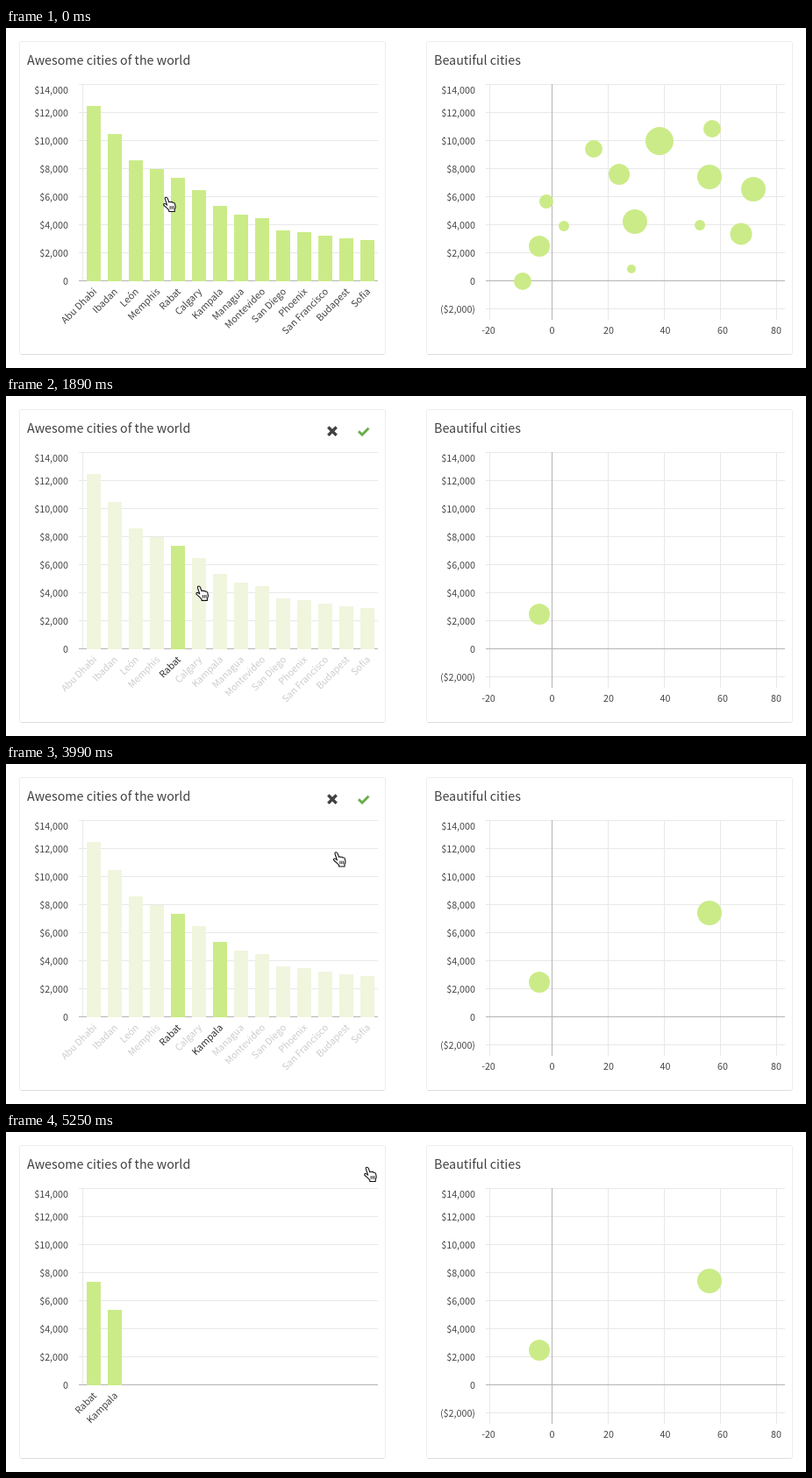
An HTML page that plays this animation: 912x388 px, repeating every 6250 ms.

```html
<!DOCTYPE html>
<html lang="en">
<head>
<meta charset="utf-8">
<title>City charts</title>
<style>
  html, body { margin: 0; width: 100%; height: 100%; overflow: hidden; background: #fff; }
  svg { display: block; width: 912px; height: 388px; }
  text { font: 10.75px "Noto Sans CJK SC", "Noto Sans CJK JP", "Noto Sans CJK", "Noto Sans", sans-serif; fill: #444; }
  .title { font-size: 14.3px; fill: #404040; }
</style>
</head>
<body>
<svg id="stage" viewBox="0 0 912 388"></svg>
<script>
const NS = 'http://www.w3.org/2000/svg';
const LOOP = 6250, STEP = 70;
const GREEN = [203, 235, 136], PALE = [240, 245, 221];
const INK = [68, 68, 68], FAINT = [204, 204, 204], STRONG = [48, 48, 48];
const GRID = '#e8e8e8', AXIS = '#b4b4b4';
const RABAT = 4, KAMPALA = 6;

const cities = [
  ['Abu Dhabi', 89], ['Ibadan', 121], ['León', 151], ['Memphis', 161], ['Rabat', 171],
  ['Calgary', 185], ['Kampala', 203], ['Managua', 213], ['Montevideo', 217], ['San Diego', 231],
  ['Phoenix', 233], ['San Francisco', 237], ['Budapest', 240], ['Sofia', 242]
];
// x, y, radius; the first two belong to Rabat and Kampala
const dots = [
  [608, 249, 12], [802, 170, 14], [589, 289, 10], [616, 198, 8], [636, 226, 6],
  [670, 138, 10], [699, 167, 12], [745, 129, 16], [717, 221, 14], [713, 275, 5],
  [791, 225, 6], [805, 115, 10], [852, 184, 14], [838, 235, 12.5]
];
// time, x, y of the pointer's top left corner
const route = [
  [0, 179, 192.5], [560, 190, 201.5], [1540, 190, 201.5], [2170, 235, 227], [2450, 242, 226.5],
  [2730, 242, 226.5], [2800, 242, 225.5], [3430, 242, 225.5], [4200, 402, 72],
  [4480, 408, 58.5], [4690, 408, 39.5], [LOOP, 408, 39.5]
];

const stage = document.getElementById('stage');

function add(tag, attrs, parent = stage) {
  const el = document.createElementNS(NS, tag);
  set(el, attrs);
  return parent.appendChild(el);
}
function set(el, attrs) {
  for (const key in attrs) el.setAttribute(key, attrs[key]);
}
function label(str, x, y, anchor = 'end', attrs = {}) {
  const el = add('text', { x, y, 'text-anchor': anchor, ...attrs });
  el.textContent = str;
  return el;
}
function line(x1, y1, x2, y2, stroke = GRID) {
  add('path', { d: `M${x1} ${y1}L${x2} ${y2}`, stroke, fill: 'none' });
}
const clamp = v => Math.max(0, Math.min(1, v));
const ramp = (t, a, b) => clamp((t - a) / (b - a));
const smooth = p => p * p * (3 - 2 * p);
const lerp = (a, b, p) => a + (b - a) * p;
const mix = (a, b, p) => `rgb(${a.map((v, i) => Math.round(lerp(v, b[i], p)))})`;

function card(x, title) {
  add('rect', { x: x + .5, y: 15.5, width: 417, height: 357, rx: 2, fill: '#fff', stroke: '#ededed' });
  line(x + 2, 372.5, x + 416, 372.5, '#dedede');
  label(title, x + 9, 42, 'start', { class: 'title' });
}
function rows(count, x1, x2, textX) {
  for (let i = 0; i < count; i++) {
    const value = 14 - 2 * i, y = 64.5 + 32 * i;
    if (value) line(x1, y, x2, y);
    const str = value > 0 ? `$${value},000` : value ? '($2,000)' : '0';
    label(str, textX, i ? y + 4 : 74.5);
  }
}

card(15, 'Awesome cities of the world');
rows(8, 83, 424, 71);
line(87.5, 64, 87.5, 288);
line(83, 288.5, 424, 288.5, AXIS);

card(479, 'Beautiful cities');
rows(9, 547, 888, 535);
[551.5, 686.5, 750.5, 814.5, 878.5].forEach(x => line(x, 64, x, 333));
line(622.5, 64, 622.5, 333, AXIS);
line(547, 288.5, 888, 288.5, AXIS);
[550, 622.5, 687, 751.5, 817, 878].forEach((x, i) => label(20 * i - 20, x, 348.5, 'middle'));

const bars = cities.map(([name, top]) => {
  const g = add('g', {});
  const rect = add('rect', { x: -8, y: top, width: 16, height: 289 - top }, g);
  const text = label(name, 0, 0, 'end', { transform: 'translate(4 301.5) rotate(-45)' });
  g.appendChild(text);
  return { g, rect, text };
});
const bubbles = dots.map(([cx, cy, r]) => add('circle', { cx, cy, r, fill: mix(GREEN, GREEN, 0) }));

const tools = add('g', { fill: 'none' });
add('path', { d: 'M367.3 35.5l9.4 9.4M376.7 35.5l-9.4 9.4', stroke: '#404040', 'stroke-width': 3.4 }, tools);
add('path', { d: 'M402 40.2l4 4 7.4-7.4', stroke: '#6aad48', 'stroke-width': 3 }, tools);

const hand = add('g', { stroke: '#111', 'stroke-width': 1.1, 'stroke-linejoin': 'round' });
add('path', {
  d: 'M4.6 9.6L2.3 2.7Q1.9.9 3.3.7Q4.7.5 5.3 2.1L6.8 6.2Q7.7 5.2 8.9 6.3Q10.1 5.4 11.2 6.8' +
     'Q12.7 6.3 13.5 8L14.2 11.3Q14.3 13 13.2 14.6V17H6.8V15.4L3.6 12.2L1 10Q.2 8.7 1.3 8.1Q2.6 7.6 4.6 9.6Z',
  fill: '#fff'
}, hand);
add('path', { d: 'M8.1 10.6v3.6M10 10.6v3.6M11.9 10.6v3.6', fill: 'none', 'stroke-width': .9 }, hand);

function pointer(t) {
  const i = Math.max(1, route.findIndex(p => p[0] >= t));
  const [t0, x0, y0] = route[i - 1], [t1, x1, y1] = route[i];
  const p = smooth(ramp(t, t0, t1));
  return [lerp(x0, x1, p), lerp(y0, y1, p)];
}

function draw(time) {
  const t = Math.floor(time / STEP) * STEP;
  const select = ramp(t, 910, 1120);
  const second = ramp(t, 2730, 2870);
  const leave = ramp(t, 4760, 4970);
  const slide = smooth(ramp(t, 4830, 5250));

  bars.forEach(({ g, rect, text }, i) => {
    const kept = i === RABAT || i === KAMPALA;
    const dim = i === RABAT ? 0 : i === KAMPALA ? select - second : select;
    const home = 100 + 24 * i;
    const goal = i === RABAT ? 100 : i === KAMPALA ? 124 : home;
    set(g, { transform: `translate(${lerp(home, goal, slide)} 0)`, opacity: kept ? 1 : 1 - leave });
    rect.style.fill = mix(GREEN, PALE, dim);
    const lit = i === RABAT ? select : i === KAMPALA ? second : 0;
    text.style.fill = dim > 0 ? mix(INK, FAINT, dim) : mix(INK, STRONG, lit * (1 - slide));
  });

  bubbles.forEach((dot, i) => {
    const shown = i === 0 ? 1 : 1 - select + (i === 1 ? ramp(t, 2870, 3150) : 0);
    set(dot, { opacity: shown });
  });

  set(tools, { opacity: select * (1 - ramp(t, 4760, 4900)) });
  set(hand, { transform: `translate(${pointer(t)})` });
}

const start = performance.now();
function tick() {
  draw((performance.now() - start) % LOOP);
  requestAnimationFrame(tick);
}
draw(0);
requestAnimationFrame(tick);
</script>
</body>
</html>
```
